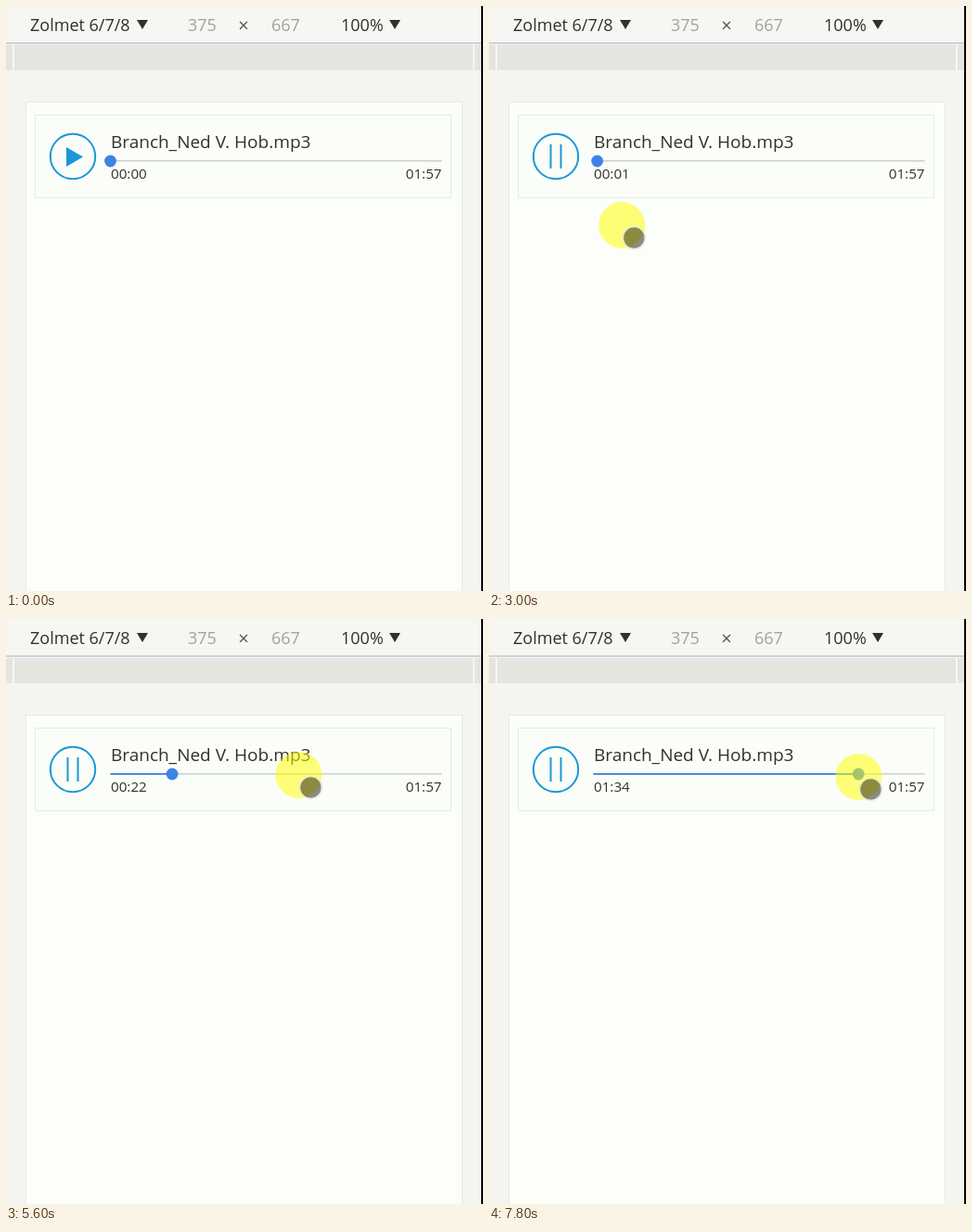
These frames come from a looping animation (514x630 px, 8 s). An HTML page with a canvas:

```html
<!DOCTYPE html>
<html lang="en">
<head>
<meta charset="utf-8">
<title>Audio player</title>
<style>
  html, body { margin: 0; width: 100%; height: 100%; overflow: hidden; background: #f4f5f0; }
  canvas { display: block; }
</style>
</head>
<body>
<canvas id="stage" width="514" height="630"></canvas>
<script>
const ctx = document.getElementById('stage').getContext('2d');
const LOOP = 8000, STEP = 200;
const DURATION = 117, TRACK_LEFT = 112.5, TRACK_WIDTH = 357;
const TEAL = '#1a98d8', BLUE = '#3d83e6', INK = '#303030', PALE_INK = '#a2a29e';

// Milestones of the demo, in ms
const ENTER = 200, PRESS_PLAY = 1400, SOUND = 1650, GRAB = 4000, DROP = 5000, SEEK = 6200;

// Pointer stops: the highlight eases from each one to the next
const stops = [
  { t: ENTER, x: 480, y: 400 },
  { t: 800, x: 163, y: 281 },
  { t: PRESS_PLAY, x: 72, y: 162 },
  { t: 1800, x: 199, y: 169 },
  { t: 3200, x: 140, y: 240 },
  { t: GRAB, x: 126, y: 161 },
  { t: DROP, x: 178, y: 166 },
  { t: 6000, x: 390, y: 169 },
  { t: 6800, x: 390, y: 169 },
  { t: LOOP, x: 399, y: 170 }
];

const mix = (a, b, k) => a + (b - a) * k;
const smooth = k => k * k * (3 - 2 * k);

function pointerAt(t) {
  const next = stops.findIndex(stop => stop.t > t);
  const from = stops[next - 1], to = stops[next];
  const k = smooth((t - from.t) / (to.t - from.t));
  return { x: mix(from.x, to.x, k), y: mix(from.y, to.y, k) };
}

// Seconds played: runs in real time, except while the handle is dragged
function playedAt(t) {
  if (t >= SEEK) return 92 + (t - SEEK) / 1000;
  if (t >= DROP) return 21.2 + (t - DROP) / 1000;
  if (t >= GRAB) return mix(2.3, 21.2, smooth((t - GRAB) / (DROP - GRAB)));
  return Math.max(0, t - SOUND) / 1000;
}

function rect(x, y, w, h, color) {
  ctx.fillStyle = color;
  ctx.fillRect(x, y, w, h);
}

function frame(x, y, w, h, fill, edge) {
  rect(x, y, w, h, edge);
  rect(x + 1, y + 1, w - 2, h - 2, fill);
}

function text(value, x, y, size, color = INK, align = 'left') {
  ctx.font = `${size}px "Open Sans", "Noto Sans", sans-serif`;
  ctx.textAlign = align;
  ctx.fillStyle = color;
  ctx.fillText(value, x, y);
}

function circle(x, y, r) {
  ctx.beginPath();
  ctx.arc(x, y, r, 0, Math.PI * 2);
}

function disc(x, y, r, color) {
  circle(x, y, r);
  ctx.fillStyle = color;
  ctx.fill();
}

function ring(x, y, r, width, color) {
  circle(x, y, r);
  ctx.lineWidth = width;
  ctx.strokeStyle = color;
  ctx.stroke();
}

function triangle(color, ...points) {
  ctx.beginPath();
  points.forEach(([x, y]) => ctx.lineTo(x, y));
  ctx.fillStyle = color;
  ctx.fill();
}

function clock(seconds) {
  const s = Math.round(seconds);
  return [Math.floor(s / 60), s % 60].map(n => String(n).padStart(2, '0')).join(':');
}

function drawBrowser(t) {
  rect(0, 0, 514, 630, '#f4f5f0');
  rect(0, 0, 512, 39, '#f6f7f3');
  rect(0, 39, 512, 2, '#cfcfe0');
  rect(0, 42, 512, 27, '#e4e5df');
  for (const x of [7, 503]) rect(x, 42, 2, 27, '#f6f7f3');

  text('Zolmet 6/7/8', 26, 27, 18);
  text('375', 196, 27, 18, PALE_INK);
  text('×', 256, 28, 20, '#555', 'center');
  text('667', 286, 27, 18, PALE_INK);
  text('100%', 361, 27, 18);
  for (const x of [141, 413]) triangle(INK, [x, 15], [x + 12, 15], [x + 6, 25]);

  frame(21, 103, 471, 540, '#fcfefa', '#e2ebe8');
  rect(512, 0, 2, 630, '#000');
  if (t >= 400 && t < PRESS_PLAY) rect(512, 49, 2, 581, '#f8f8f6');
}

function drawPlayer(t) {
  const played = playedAt(t);
  const progress = TRACK_WIDTH * played / DURATION;

  frame(31, 117, 449, 90, '#fbfdf9', '#dfeee6');
  ring(72, 162, 24.2, 2, TEAL);
  if (t < PRESS_PLAY) {
    triangle(TEAL, [65, 152], [83, 162.5], [65, 173]);
  } else {
    for (const x of [65.5, 76.5]) rect(x, 149, 2, 26, TEAL);
  }

  text('Branch_Ned V. Hob.mp3', 113, 153, 19);
  rect(TRACK_LEFT, 166, TRACK_WIDTH, 1.6, '#ccd2d0');
  rect(TRACK_LEFT, 166, progress, 1.8, BLUE);
  disc(TRACK_LEFT + progress, 167, 6.4, BLUE);
  text(clock(played), 113, 186, 15.2);
  text(clock(DURATION), 469.5, 186, 15.2, INK, 'right');
}

function drawPointer(t) {
  if (t < ENTER) return;
  const { x, y } = pointerAt(t);
  disc(x, y, 25, 'rgba(255,255,0,.53)');
  disc(x + 13, y + 13.5, 11.5, 'rgba(0,0,0,.45)');
  ring(x + 13, y + 13.5, 12, 1.8, 'rgba(232,232,222,.85)');
}

function render(now) {
  const t = Math.floor(now % LOOP / STEP) * STEP;
  drawBrowser(t);
  drawPlayer(t);
  drawPointer(t);
  requestAnimationFrame(render);
}
requestAnimationFrame(render);
</script>
</body>
</html>
```
